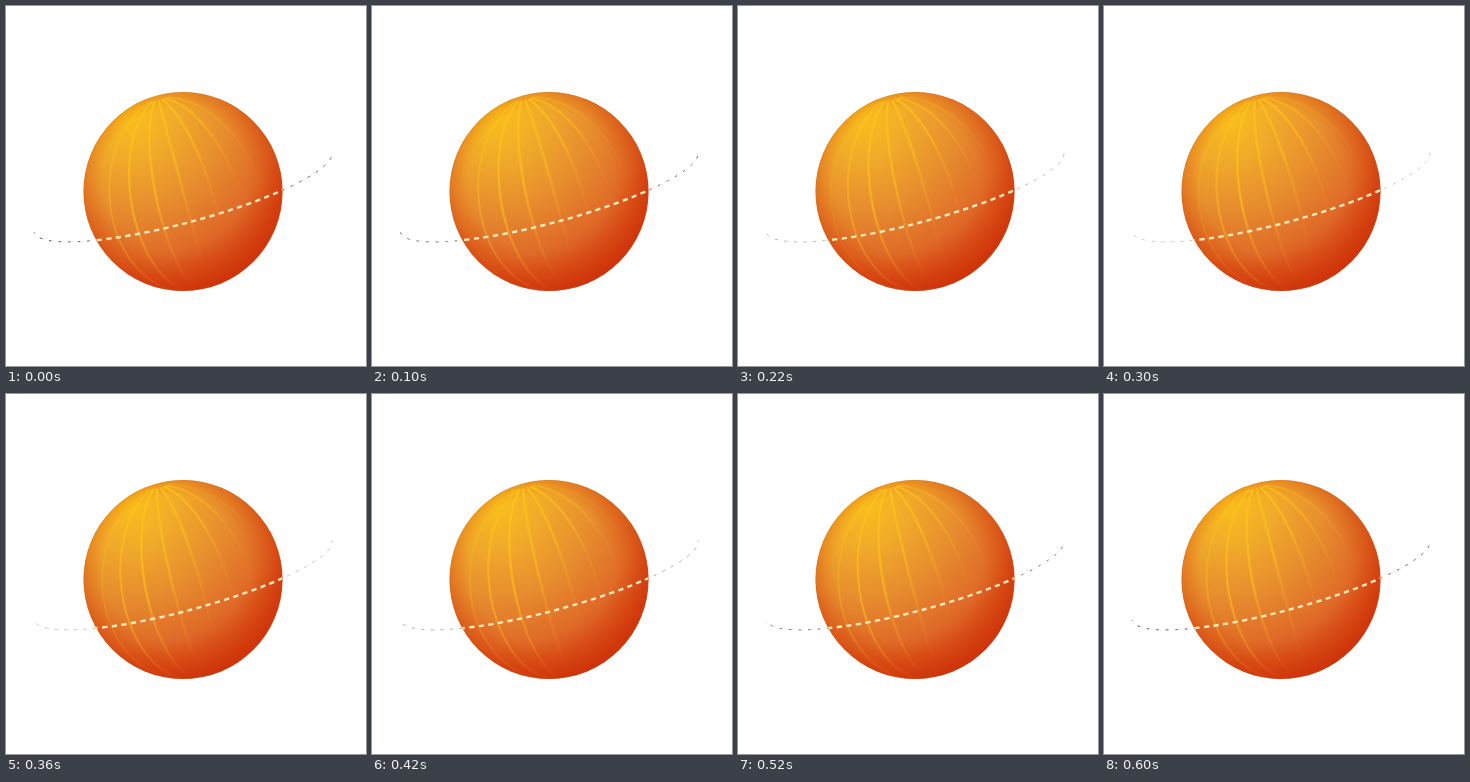
Write an HTML page with a canvas that moves like this. It is 360 px wide and 360 px high and loops after 0.62 s.

```html
<!DOCTYPE html>
<html lang="en">
<head>
<meta charset="utf-8">
<title>Spinning globe</title>
<style>
  html, body { margin: 0; width: 100%; height: 100%; overflow: hidden; background: #fff; }
  canvas { display: block; }
</style>
</head>
<body>
<canvas id="stage" width="360" height="360"></canvas>
<script>
const ctx = document.getElementById('stage').getContext('2d');
const LOOP = 620, STEP = 20;
const CX = 177, CY = 185.5, R = 99.5;
const ROLL = -0.262;                  // tilt of the axis in the picture plane
const PITCH = 0.2;                    // the globe is seen slightly from above
const SPACING = Math.PI * 2 / 22;     // angle between meridians
const DASH = 5.2, GAP = 4.4;

function withStops(gradient, stops) {
  stops.forEach(([at, color]) => gradient.addColorStop(at, color));
  return gradient;
}

const body = withStops(ctx.createRadialGradient(125, 108, 0, 125, 108, 192), [
  [0, '#f9c01c'], [0.25, '#f0a92a'], [0.5, '#e68c2e'],
  [0.75, '#df6a28'], [0.87, '#d84e1c'], [1, '#cb3410']
]);
// Shifted towards the light, so the lower right edge is the darkest
const rim = withStops(ctx.createRadialGradient(CX - 8, CY - 11, 0, CX - 8, CY - 11, R + 13), [
  [0, 'rgba(218,78,6,0)'], [0.65, 'rgba(218,78,6,0)'], [1, 'rgba(208,50,8,0.75)']
]);
const lineFade = withStops(ctx.createLinearGradient(110, 130, 245, 230), [
  [0, 'rgba(253,196,26,0.9)'], [0.4, 'rgba(250,182,32,0.75)'],
  [0.65, 'rgba(243,148,40,0.4)'], [0.9, 'rgba(236,110,36,0)']
]);

function project(lat, lon) {
  const x = R * Math.cos(lat) * Math.sin(lon);
  const depth = R * Math.cos(lat) * Math.cos(lon);
  const y = -R * Math.sin(lat) * Math.cos(PITCH) + depth * Math.sin(PITCH);
  return [CX + x * Math.cos(ROLL) - y * Math.sin(ROLL),
          CY + x * Math.sin(ROLL) + y * Math.cos(ROLL)];
}

function circle(radius) {
  ctx.beginPath();
  ctx.arc(CX, CY, radius, 0, Math.PI * 2);
}

function drawMeridian(lon) {
  ctx.beginPath();
  for (let lat = -1.35; lat < 1.5; lat += 0.05) ctx.lineTo(...project(lat, lon));
  ctx.globalAlpha = Math.min(1, Math.max(0, 2 * Math.cos(lon) - 0.85));
  ctx.lineWidth = 1 + 1.6 * Math.cos(lon);
  ctx.stroke();
  ctx.globalAlpha = 1;
}

function strokeOrbit(color, width, dash, phase) {
  ctx.beginPath();
  ctx.ellipse(CX, CY + 0.8, 154, 30.5, ROLL, Math.PI, 0, true);
  ctx.setLineDash([dash, DASH + GAP - dash]);
  ctx.lineDashOffset = 1.4 - (DASH + GAP) * phase;
  ctx.strokeStyle = color;
  ctx.lineWidth = width;
  ctx.stroke();
  ctx.setLineDash([]);
}

function draw(phase) {
  ctx.clearRect(0, 0, 360, 360);
  const dark = 0.5 + 0.3 * Math.cos(phase * Math.PI * 2);

  // Faint trail outside the ball, covered by the ball itself
  strokeOrbit('rgba(225,205,180,0.5)', 0.8, DASH, phase);
  strokeOrbit(`rgba(70,55,40,${dark})`, 1, 2.5, phase);

  ctx.save();
  circle(R);
  ctx.fillStyle = body;
  ctx.fill();
  ctx.clip();
  ctx.fillStyle = rim;
  ctx.fill();
  ctx.strokeStyle = lineFade;
  for (let k = -4; k <= 3; k++) drawMeridian((k + phase) * SPACING);
  strokeOrbit('#ffebc0', 2.4, DASH, phase);
  ctx.restore();

  circle(R - 0.3);
  ctx.strokeStyle = 'rgba(190,100,40,0.4)';
  ctx.lineWidth = 0.7;
  ctx.stroke();
}

function tick(now) {
  draw(Math.floor(now % LOOP / STEP) * STEP / LOOP);
  requestAnimationFrame(tick);
}
tick(0);
</script>
</body>
</html>
```
